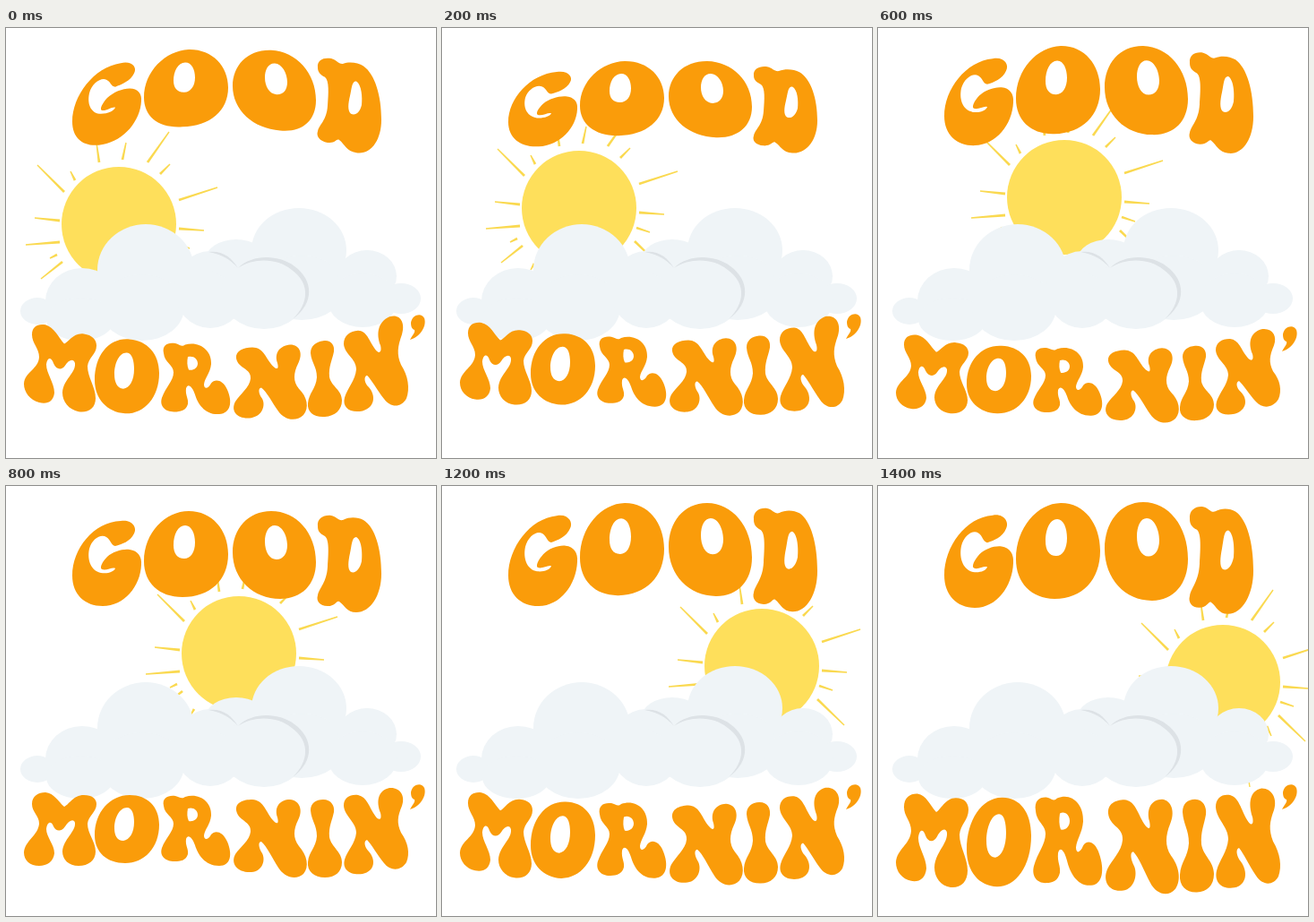
Recreate the animation shown at these times as an HTML page with a canvas. Size 480 by 480 pixels, loop 1600 ms.

```html
<!DOCTYPE html>
<html lang="en">
<head>
<meta charset="utf-8">
<title>Good Mornin'</title>
<style>
  html, body { margin: 0; width: 100%; height: 100%; overflow: hidden; background: #fff; }
  canvas { display: block; width: 480px; height: 480px; }
</style>
</head>
<body>
<canvas id="stage" width="480" height="480"></canvas>
<script>
const ctx = document.getElementById('stage').getContext('2d');
const STEP = 200, STEPS = 8;
const ORANGE = '#fa9c0a', SUN = '#fedf5b', RAY = '#fad950', CLOUD = '#eff4f7', SHADE = '#dde2e6';

// Letter outlines in the resting pose; holes are cut by the even-odd rule.
const good = {
  at: [113, 205, 300, 383],
  top: [38, 28, 28, 33],
  bottom: [134, 124, 126, 141],
  glyphs: [
    'M128,39 C140,37 147,46 143,53 C139,62 129,65 122,67 C117,66 117,60 112,57 C106,53 96,59 93,70 C90,84 96,95 106,97 C114,98 120,96 122,92 C119,90 112,95 107,93 C104,91 108,84 113,79 C120,73 130,70 138,71 C147,72 152,79 151,88 C150,112 132,134 108,134 C88,134 74,121 74,100 C74,70 98,40 128,39 Z',
    'M204,28 C230,28 248,49 248,76 C248,105 228,124 197,124 C171,124 154,108 154,84 C154,52 178,28 204,28 Z M200,44 C207,44 211,53 211,63 C211,74 206,81 199,81 C191,81 187,75 187,66 C187,54 192,44 200,44 Z',
    'M296,28 C324,28 346,52 346,85 C346,110 330,126 306,126 C276,126 253,104 253,74 C253,48 270,28 296,28 Z M300,44 C308,44 314,55 314,66 C314,76 309,82 302,82 C294,82 289,73 289,62 C289,52 293,44 300,44 Z',
    'M348,45 C347,36 355,32 363,33 C369,34 371,39 376,38 C384,34 393,35 399,38 C412,46 419,70 419,98 C419,122 407,141 391,141 C380,141 378,133 372,129 C369,127 368,134 359,134 C350,134 346,128 348,122 C350,113 358,108 359,90 C360,75 361,60 356,56 C350,53 348,50 348,45 Z M391,57 C397,60 398,75 397,84 C395,93 390,98 385,96 C381,93 382,84 384,75 C386,66 386,57 391,57 Z'
  ]
};

const mornin = {
  at: [60, 170, 285, 420],
  top: [342, 345, 350, 337],
  bottom: [424, 422, 437, 433],
  glyphs: [
    'M29,355 C29,346 36,342 44,342 C54,343 58,352 65,358 C70,356 75,345 87,345 C96,345 101,349 101,355 C101,364 92,368 91,377 C91,388 100,397 100,408 C100,418 92,424 81,424 C70,424 63,417 63,408 C64,394 78,386 77,376 C76,371 70,373 66,380 C62,386 56,386 53,380 C51,374 46,374 45,383 C45,392 54,400 54,410 C53,419 46,424 37,424 C27,424 20,418 20,409 C21,396 36,390 37,377 C37,368 29,364 29,355 Z',
    'M138,345 C158,345 171,358 171,378 C171,404 154,421 133,421 C113,421 99,409 99,390 C99,364 116,345 138,345 Z M135,359 C141,359 143,367 143,375 C143,387 138,395 131,396 C124,396 121,390 121,382 C121,370 127,359 135,359 Z',
    'M176,357 C174,348 181,345 189,346 C194,347 196,350 200,347 C215,342 230,352 229,368 C228,378 222,383 221,390 C221,396 226,395 229,389 C233,384 242,385 247,397 C253,411 251,424 238,424 C222,424 214,411 211,401 C208,392 203,388 201,394 C200,402 204,405 203,411 C201,418 195,419 188,419 C178,419 171,413 174,404 C178,393 187,386 187,377 C187,369 177,367 176,357 Z M203,360 C209,358 214,362 214,367 C214,372 209,375 204,374 C202,370 202,365 203,360 Z',
    'M257,362 C256,353 265,350 275,350 C287,351 289,361 297,372 C302,378 305,378 303,370 C299,358 306,350 317,350 C328,351 332,362 326,373 C321,383 320,393 327,402 C336,412 339,425 332,433 C323,441 310,436 304,426 C297,415 291,402 285,397 C281,397 282,404 286,410 C290,418 286,430 274,431 C259,432 250,422 256,411 C261,403 272,396 273,386 C274,374 259,374 257,362 Z',
    'M340,362 C340,354 346,350 354,350 C363,350 367,357 366,364 C364,374 360,380 361,392 C363,403 375,408 375,420 C375,431 367,437 356,437 C344,437 336,430 337,420 C338,408 346,404 347,391 C347,378 341,374 340,362 Z',
    'M377,357 C377,348 384,344 393,345 C403,347 405,358 412,368 C416,374 420,373 418,365 C413,352 415,340 428,337 C440,336 446,346 442,357 C437,369 436,376 441,387 C449,398 451,410 447,420 C441,430 429,430 422,421 C414,411 408,400 403,395 C399,396 400,403 405,408 C413,417 412,430 398,433 C384,435 375,428 378,417 C381,407 390,399 391,387 C391,375 378,369 377,357 Z'
  ]
};
const APOSTROPHE = 'M452,342 C453,333 464,330 467,337 C470,346 462,358 451,361 C454,355 457,353 456,350 C453,349 452,346 452,342 Z';

// Shift of the top and bottom edge of each word, at its four anchors.
const goodPoses = [
  [[2, -4, -3, 3], [-5, -14, -12, -3]],
  [[11, 9, 9, 11], [-2, -4, -4, -2]],
  [[3, -2, -2, 3], [-3, -6, -6, -2]],
  [[-4, -8, -8, -4], [-3, -6, -7, -2]],
  [[0, 0, 0, 0], [0, 0, 0, 0]],
  [[-5, -12, -12, -9], [-2, -7, -8, -3]],
  [[-5, -9, -9, -8], [0, -2, -3, -1]],
  [[-6, -9, -10, -10], [2, 2, 2, 2]]
];
const morninPoses = [
  [[-8, 5, 6, -13], [0, 10, 3, -6]],
  [[-11, -2, -2, -14], [-6, 0, -3, -5]],
  [[-4, 5, 4, -7], [-1, 5, 6, -4]],
  [[3, 11, 9, 0], [4, 10, 6, -4]],
  [[0, 0, 0, 0], [0, 0, 0, 0]],
  [[3, 12, 9, 0], [7, 19, 11, 0]],
  [[2, 8, 6, 0], [10, 17, 11, 6]],
  [[2, 2, 0, 0], [21, 26, 21, 16]]
];

const sunPath = [[126, 219], [153, 201], [180, 194], [208, 189], [260, 187], [305, 187], [357, 201], [385, 219]];

// Inner and outer end of each ray, from the sun's centre.
const rays = [
  [-61, -36, -91, -66], [-49, -49, -54, -59], [-22, -69, -25, -91], [4, -72, 8, -91],
  [32, -69, 56, -103], [46, -56, 57, -67], [67, -27, 110, -41], [67, 5, 95, 7],
  [64, 22, 79, 27], [62, 37, 92, 66], [49, 49, 54, 60], [23, 72, 30, 117],
  [-50, 62, -54, 69], [-63, 42, -87, 61], [-69, 34, -77, 38], [-66, 20, -104, 23], [-66, -4, -94, -7]
];

const puffs = [
  [35, 316, 19, 15], [85, 305, 41, 37], [83, 325, 38, 24], [156, 270, 54, 51], [152, 312, 47, 37],
  [228, 292, 40, 43], [257, 258, 34, 22], [327, 248, 53, 47], [330, 290, 48, 36], [403, 277, 33, 29],
  [441, 302, 22, 17], [398, 304, 39, 30], [288, 296, 48, 40]
];

// Lagrange interpolation through the anchors
function curve(xs, ys, x) {
  return ys.reduce((sum, y, i) =>
    sum + xs.reduce((p, xj, j) => j === i ? p : p * (x - xj) / (xs[i] - xj), y), 0);
}

function mapPath(d, fn) {
  return new Path2D(d.replace(/(\d+),(\d+)/g, (m, x, y) => x + ',' + fn(+x, +y).toFixed(2)));
}

function buildWord(word, [dTop, dBottom]) {
  return word.glyphs.map(d => mapPath(d, (x, y) => {
    const top = curve(word.at, word.top, x);
    const v = (y - top) / (curve(word.at, word.bottom, x) - top);
    return y + (1 - v) * curve(word.at, dTop, x) + v * curve(word.at, dBottom, x);
  }));
}

const poses = sunPath.map((sun, i) => ({
  sun,
  letters: [
    ...buildWord(good, goodPoses[i]),
    ...buildWord(mornin, morninPoses[i]),
    mapPath(APOSTROPHE, (x, y) => y + morninPoses[i][0][3])
  ]
}));

const shades = [
  'M259,268 C275,252 305,253 322,266 C344,282 344,308 320,325 C338,308 340,285 319,270 C303,257 277,256 259,268 Z',
  'M226,250 C241,248 252,256 259,268 C250,258 242,253 226,250 Z'
].map(d => new Path2D(d));

function ellipse(x, y, rx, ry, color) {
  ctx.fillStyle = color;
  ctx.beginPath();
  ctx.ellipse(x, y, rx, ry, 0, 0, Math.PI * 2);
  ctx.fill();
}

function drawRay([x1, y1, x2, y2]) {
  const len = Math.hypot(x2 - x1, y2 - y1);
  const nx = (y1 - y2) / len, ny = (x2 - x1) / len;
  const a = 1.4, b = 0.7;
  ctx.beginPath();
  ctx.moveTo(x1 + nx * a, y1 + ny * a);
  ctx.lineTo(x2 + nx * b, y2 + ny * b);
  ctx.lineTo(x2 - nx * b, y2 - ny * b);
  ctx.lineTo(x1 - nx * a, y1 - ny * a);
  ctx.fill();
}

function drawSun(x, y) {
  ctx.save();
  ctx.translate(x, y);
  ctx.fillStyle = RAY;
  rays.forEach(drawRay);
  ellipse(0, 0, 64, 64, SUN);
  ctx.restore();
}

function drawClouds() {
  puffs.forEach(p => ellipse(...p, CLOUD));
  ctx.fillStyle = SHADE;
  shades.forEach(s => ctx.fill(s));
}

function draw(now) {
  const pose = poses[Math.floor(now / STEP) % STEPS];
  ctx.fillStyle = '#fff';
  ctx.fillRect(0, 0, 480, 480);
  drawSun(...pose.sun);
  drawClouds();
  ctx.fillStyle = ORANGE;
  pose.letters.forEach(p => ctx.fill(p, 'evenodd'));
}

let start = null;
function tick(now) {
  if (start === null) start = now;
  draw(now - start);
  requestAnimationFrame(tick);
}
draw(0);
requestAnimationFrame(tick);
</script>
</body>
</html>
```
